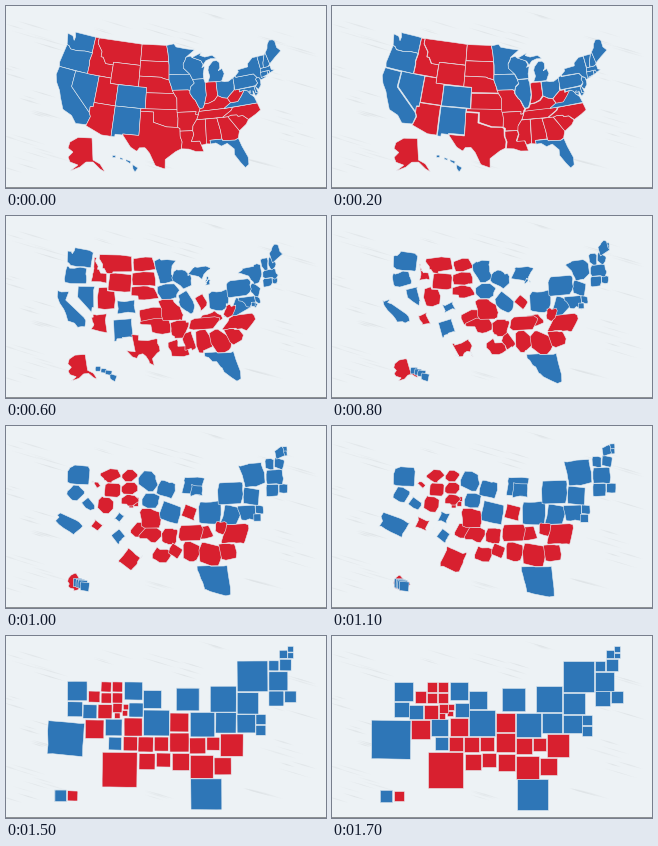
Write a matplotlib script that moves like this. It is 320 by 182 pixels and loops after 1.8 s.

```python
import numpy as np
import matplotlib.pyplot as plt
from matplotlib.animation import FuncAnimation
from matplotlib.patches import Polygon

W, H, DPI = 320, 182, 100
FRAMES, STEP = 18, 100
N = 160  # outline samples per shape
RED, BLUE = "#d8202f", "#2e76b7"
PAPER, STREAK = "#edf2f5", "#dfe4e7"

fig = plt.figure(figsize=(W / DPI, H / DPI), dpi=DPI, facecolor=PAPER)
ax = fig.add_axes([0, 0, 1, 1])
ax.set(xlim=(0, W), ylim=(H, 0))
ax.axis("off")


def geo(*values):
    """Albers projection of west longitude / latitude pairs to stage pixels."""
    lon, lat = np.radians(np.reshape(values, (-1, 2)).T)
    s1, s2 = np.sin(np.radians([29.5, 45.5]))
    n = (s1 + s2) / 2
    c = 1 - s1 ** 2 + 2 * n * s1

    def radius(phi):
        return np.sqrt(c - 2 * n * np.sin(phi)) / n

    theta = n * (np.radians(96) - lon)
    x = radius(lat) * np.sin(theta)
    y = radius(np.radians(37.5)) - radius(lat) * np.cos(theta)
    return np.column_stack([165 + 311.5 * x, 101 - 306 * y])


def flat(*values):
    return np.reshape(values, (-1, 2)).astype(float)


def dot(lon, lat, r=0.3):
    return geo(lon + r, lat + r, lon - r, lat + r, lon - r, lat - r, lon + r, lat - r)


def resample(points):
    """Even spacing along the closed outline."""
    ring = np.vstack([points, points[:1]])
    dist = np.r_[0, np.cumsum(np.hypot(*np.diff(ring, axis=0).T))]
    at = np.linspace(0, dist[-1], N, endpoint=False)
    return np.column_stack([np.interp(at, dist, ring[:, k]) for k in (0, 1)])


shapes = []


def state(color, x, y, size, points, turn=25, start=50, end=1600):
    """Morph an outline into a square, with its corners turned by some degrees."""
    square = flat(x, y, x + size, y, x + size, y + size, x, y + size)
    goal = np.roll(resample(square), round(N * turn / 360), axis=0)
    patch = Polygon(points, closed=True, fc=color, ec="#e6edf2", lw=0.4, joinstyle="round")
    ax.add_patch(patch)
    shapes.append((patch, resample(points), goal, start, end))


def streaks():
    rng = np.random.default_rng(7)
    spots = [(2, 20), (25, 30), (0, 62), (18, 88), (0, 130), (22, 140), (0, 155),
             (195, 4), (145, 20), (165, 30), (255, 26), (280, 38), (270, 70),
             (262, 108), (275, 128), (245, 150), (140, 158), (95, 18), (20, 108)]
    for x, y in spots:
        for _ in range(3):
            x0, y0 = x + rng.uniform(-8, 12), y + rng.uniform(-5, 6)
            length, thick = rng.uniform(12, 36), rng.uniform(0.5, 1.6)
            x1, y1 = x0 + length, y0 + 0.3 * length
            ax.fill([x0, (x0 + x1) / 2, x1, (x0 + x1) / 2],
                    [y0, (y0 + y1) / 2 - thick / 2, y1, (y0 + y1) / 2 + thick / 2],
                    color=STREAK, lw=0, alpha=rng.uniform(0.5, 1))


streaks()
ax.axhspan(181, 182, color="#8d9194", lw=0)

# West
state(BLUE, 61.5, 45.5, 19.5, geo(
    124.7, 48.4, 123.2, 48.2, 122.5, 47.4, 122.4, 48.2, 122.8, 49, 117, 49, 117, 46.4,
    116.9, 46, 119, 46, 121, 45.7, 122.8, 45.7, 123.4, 46.2, 124, 46.3), 40)
state(BLUE, 61.5, 66, 15, geo(
    124, 46.3, 123.4, 46.2, 122.8, 45.7, 121, 45.7, 119, 46, 116.9, 46, 117.2, 44.4,
    117, 43.8, 117, 42, 124.2, 42, 124.5, 42.8), 75)
state(BLUE, 39, 84, 40, geo(
    124.2, 42, 120, 42, 120, 39, 114.6, 35, 114.2, 34.3, 114.7, 32.7, 117.1, 32.5,
    118.4, 33.8, 120.6, 34.5, 121.9, 36.6, 122.5, 37.7, 123.7, 39, 124.4, 40.4),
    105, end=1850)
state(BLUE, 77, 68.5, 14, geo(
    120, 42, 114, 42, 114, 36.2, 114.7, 36.1, 114.6, 35, 120, 39), 100)
state(RED, 82.5, 55, 11.5, geo(
    117, 49, 116, 49, 116, 48, 114.5, 46.6, 114.5, 45.6, 113.9, 45.6, 113, 44.5,
    111, 44.5, 111, 42, 117, 42, 117, 43.8, 117.2, 44.4, 116.9, 46, 117, 46.4), 110)
state(RED, 95, 46, 10, geo(
    116, 49, 104, 49, 104, 45, 111, 45, 111, 44.5, 113, 44.5, 113.9, 45.6,
    114.5, 45.6, 114.5, 46.6, 116, 48), 80)
state(RED, 95, 57, 10, geo(111, 45, 104, 45, 104, 41, 111, 41), 30)
state(RED, 92, 68.5, 14, geo(
    114, 42, 111, 42, 111, 41, 109, 41, 109, 37, 114, 37), 50)
state(RED, 79, 83.5, 19, geo(
    114, 37, 109, 37, 109, 31.3, 111.1, 31.3, 114.8, 32.5, 114.2, 34.3, 114.6, 35,
    114.7, 36.1, 114, 36.2), 115)
state(BLUE, 99, 83, 17, geo(109, 41, 102, 41, 102, 37, 109, 37), 140)
state(BLUE, 102.5, 101, 13, geo(
    109, 37, 103, 37, 103, 32, 106.6, 32, 106.5, 31.8, 108.2, 31.8, 108.2, 31.3,
    109, 31.3), 95)

# Plains
state(RED, 106, 46, 10, geo(104, 49, 97.2, 49, 96.8, 47.5, 96.6, 45.9, 104, 45.9), 70)
state(RED, 106, 57, 10, geo(
    104, 45.9, 96.6, 45.9, 96.5, 45.3, 96.5, 42.5, 98, 42.8, 98.5, 43, 104, 43), 60)
for x, y in [(116, 68), (115, 74.5), (107, 77)]:
    state(RED, x, y, 5.5, dot(99.8, 41.5), 0, end=1700)
state(RED, 106.5, 67.5, 9, geo(
    104, 43, 98.5, 43, 98, 42.8, 96.5, 42.5, 95.8, 41, 95.7, 40.6, 95.3, 40, 102, 40,
    102, 41, 104, 41), 60)
state(RED, 117, 101, 14, geo(102, 40, 95.3, 40, 94.6, 39.1, 94.6, 37, 102, 37), 75)
state(RED, 132, 101, 15, geo(
    103, 37, 94.6, 37, 94.4, 35.4, 94.5, 33.7, 97, 33.8, 100, 34.6, 100, 36.5,
    103, 36.5), 70)
state(RED, 95.5, 116, 35.5, geo(
    103, 36.5, 100, 36.5, 100, 34.6, 97, 33.8, 94.5, 33.7, 94, 33.5, 94, 32, 93.6, 31,
    93.8, 29.7, 95, 29.2, 97.2, 27.7, 97.2, 25.9, 99.2, 26.5, 100.5, 28.8, 101.5, 29.8,
    102.7, 29.7, 103.2, 29, 104.6, 29.7, 106.5, 31.8, 106.6, 32, 103, 32), 110)

# Midwest
state(BLUE, 118, 46, 18, geo(
    97.2, 49, 95.2, 49.3, 94.6, 48.7, 92, 48.3, 89.6, 48, 92, 46.7, 92.3, 46.1,
    92.8, 45.5, 92.8, 44.7, 91.2, 43.5, 96.5, 43.5, 96.5, 45.3, 96.6, 45.9, 96.8, 47.5), 65)
state(BLUE, 122.5, 67, 14, geo(
    96.5, 43.5, 91.2, 43.5, 90.6, 42.5, 90.2, 41.8, 91.1, 41.2, 91.4, 40.4, 91.8, 40.6,
    95.7, 40.6, 95.8, 41, 96.5, 42.5), 55)
state(RED, 117.5, 82, 18, geo(
    95.7, 40.6, 91.8, 40.6, 91.4, 40.4, 91.4, 39.9, 90.7, 39, 90.2, 38.6, 89.5, 37.3,
    89.2, 37, 89.5, 36.5, 89.7, 36, 90.4, 36, 90.2, 36.5, 94.6, 36.5, 94.6, 39.1,
    95.3, 40))
state(BLUE, 137, 54.5, 18, geo(
    92, 46.7, 90.8, 46.9, 90.4, 46.6, 88.1, 45.9, 87.6, 45.1, 88, 44.6, 87.3, 44.8,
    87.8, 43.4, 87.8, 42.5, 90.6, 42.5, 91.2, 43.5, 92.8, 44.7, 92.8, 45.5, 92.3, 46.1), 60)
state(BLUE, 137, 74, 26, geo(
    90.6, 42.5, 87.8, 42.5, 87.5, 41.7, 87.5, 39.4, 88.1, 37.8, 88.5, 37.1, 89.2, 37,
    89.5, 37.3, 90.2, 38.6, 90.7, 39, 91.4, 39.9, 91.4, 40.4, 91.1, 41.2, 90.2, 41.8), 70)
state(BLUE, 170, 52, 23, geo(
    90.4, 46.6, 87.8, 47.4, 88.3, 46.9, 87, 46.5, 85, 46.7, 84, 46, 85.5, 46.1,
    86.8, 45.8, 87.6, 45.1, 88.1, 45.9), 100)
state(BLUE, 170, 52, 23, geo(
    85, 45.6, 84, 45.6, 83.4, 45.2, 83.4, 44.2, 83.9, 43.7, 82.9, 44, 82.5, 43,
    83.4, 41.7, 84.8, 41.7, 86.8, 41.8, 86.2, 42.8, 86.5, 44, 86.2, 44.7), 150)
state(RED, 163.5, 77, 19, geo(
    87.5, 41.7, 86.8, 41.8, 84.8, 41.7, 84.8, 39.1, 85.7, 38.3, 87, 37.9, 88.1, 37.8,
    87.5, 39.4), 90)
state(BLUE, 184, 76.5, 24.5, geo(
    84.8, 41.7, 83.4, 41.7, 82.7, 41.5, 81.7, 41.5, 80.5, 42, 80.5, 40.6, 80.7, 39.7,
    81.8, 39, 82.6, 38.4, 83.7, 38.6, 84.8, 39.1))

# South
state(RED, 183.5, 102, 16, geo(
    89.2, 37, 88.5, 37.1, 88.1, 37.8, 87, 37.9, 85.7, 38.3, 84.8, 39.1, 83.7, 38.6,
    82.6, 38.4, 82, 37.5, 83.7, 36.6, 89.5, 36.5), -10)
state(RED, 163.5, 97, 19, geo(
    89.5, 36.5, 83.7, 36.6, 81.7, 36.6, 82.1, 36.1, 84.3, 35, 90.2, 35, 89.7, 36))
state(RED, 148, 101, 14, geo(
    94.6, 36.5, 90.2, 36.5, 90.4, 36, 89.7, 36, 90.2, 35, 91.1, 33.9, 91.2, 33, 94, 33,
    94, 33.5, 94.5, 33.7, 94.4, 35.4), 45)
state(RED, 132.5, 117.5, 16, geo(
    94, 33, 91.2, 33, 91, 32.3, 91.6, 31, 89.8, 31, 89.5, 30.2, 89.1, 29, 90.8, 29.1,
    92.2, 29.6, 93.8, 29.7, 93.6, 31, 94, 32), 70)
state(RED, 150, 117, 14, geo(
    90.2, 35, 88.2, 35, 88.4, 30.4, 89.5, 30.2, 89.8, 31, 91.6, 31, 91, 32.3, 91.2, 33,
    91.1, 33.9), 60)
state(RED, 166, 117.5, 17, geo(
    88.2, 35, 85.6, 35, 85.1, 32.6, 85, 31, 87.6, 31, 87.5, 30.3, 88.4, 30.4))
state(RED, 184, 119.5, 23, geo(
    85.6, 35, 83.1, 35, 81.9, 33.4, 81, 32.1, 81.5, 30.8, 82.2, 30.5, 84.9, 30.7,
    85, 31, 85.1, 32.6), 40)
state(BLUE, 184.5, 143, 31, geo(
    87.6, 31, 85, 31, 84.9, 30.7, 82.2, 30.5, 81.5, 30.8, 81, 29.2, 80.1, 27, 80.2, 25.6,
    81, 25.1, 81.8, 26.2, 82.8, 27.8, 82.7, 28.9, 84, 30.1, 85.3, 29.7, 86.4, 30.4,
    87.5, 30.3), 0)
state(RED, 208, 122, 17, geo(
    83.1, 35, 82.3, 35.2, 81, 35.1, 80.8, 34.8, 79.7, 34.8, 78.6, 33.9, 79.3, 33.1,
    81, 32.1, 81.9, 33.4), 0)
state(RED, 214.5, 98, 22.5, geo(
    81.7, 36.6, 75.9, 36.6, 75.5, 35.2, 76.8, 34.6, 78.6, 33.9, 79.7, 34.8, 80.8, 34.8,
    81, 35.1, 82.3, 35.2, 83.1, 35, 84.3, 35, 82.1, 36.1))
state(BLUE, 209.5, 76.5, 20.5, geo(
    79.3, 38.4, 78.3, 39.4, 77.5, 39.1, 77, 38.4, 76.3, 37.8, 75.9, 36.6, 83.7, 36.6,
    82, 37.5, 80.3, 37.5))
state(RED, 200.5, 101.5, 13, geo(
    80.5, 40.6, 80.5, 39.7, 79.5, 39.7, 79.5, 39.2, 78.3, 39.4, 79.3, 38.4, 80.3, 37.5,
    82, 37.5, 82.6, 38.4, 81.8, 39, 80.7, 39.7), 45)

# Northeast
state(BLUE, 231, 78.5, 18.5, geo(
    79.5, 39.7, 75.8, 39.7, 75.7, 38.5, 75.1, 38.4, 75.9, 37.9, 76.3, 39, 76.4, 38.2,
    77, 38.4, 77.5, 39.1, 78.3, 39.4, 79.5, 39.2), 0)
state(BLUE, 250, 78.5, 10, geo(75.8, 39.7, 75.5, 39.8, 75.1, 38.4, 75.7, 38.5))
state(BLUE, 250, 89.5, 10, dot(77, 38.9, 0.15), 0)
state(BLUE, 231, 56.5, 21.5, geo(
    74.7, 41.3, 74, 41, 74, 40.4, 74.1, 39.7, 74.9, 39, 75.5, 39.6, 74.8, 40.2,
    75.1, 40.9))
state(BLUE, 204, 50, 26, geo(
    80.5, 42, 79.8, 42.3, 79.8, 42, 75.3, 42, 74.7, 41.3, 75.1, 40.9, 74.8, 40.2,
    75.5, 39.8, 80.5, 39.7), 35)
state(BLUE, 231, 24.5, 31, geo(
    79.8, 42.3, 78.9, 42.9, 79, 43.3, 76.3, 43.5, 76.2, 44.1, 74.7, 45, 73.4, 45,
    73.3, 42.7, 73.5, 41.1, 72, 41, 73.9, 40.6, 74, 41, 74.7, 41.3, 75.3, 42, 79.8, 42), -25)
state(BLUE, 263, 55, 15, geo(73.5, 42, 71.8, 42, 71.9, 41.3, 73.6, 41))
state(BLUE, 279, 55, 11.5, geo(71.8, 42, 71.2, 42, 71.3, 41.5, 71.9, 41.3))
state(BLUE, 263, 35.5, 19, geo(
    73.3, 42.7, 71.3, 42.7, 70.8, 42.9, 70.7, 42, 70, 41.8, 71.2, 41.5, 71.3, 42,
    73.5, 42))
state(BLUE, 263, 24.5, 10, geo(73.4, 45, 71.5, 45, 72.3, 43.6, 72.5, 42.7, 73.3, 42.7))
state(BLUE, 274, 23, 11.5, geo(
    71.5, 45, 71.1, 45.3, 70.7, 43.1, 71.3, 42.7, 72.5, 42.7, 72.3, 43.6), 40)
for x, y in [(282, 10), (282, 16.5)]:
    state(BLUE, x, y, 5.7, dot(69, 45.5), 0)
state(BLUE, 273.5, 14, 8, geo(
    71.1, 45.3, 70.3, 46, 70, 46.7, 69.2, 47.4, 68.3, 47.3, 67.8, 47, 67.8, 45.7,
    67, 44.9, 69, 44, 70.7, 43.1), 0)

# Insets, placed straight in stage pixels
state(RED, 61.5, 155, 10, flat(
    64, 136, 72, 131.5, 86, 132, 87, 154, 94, 158, 99, 166, 94, 163, 87, 156, 80, 156,
    74, 161, 64, 165, 72, 159, 64, 156, 62, 151, 67, 146, 62, 142), 50)
for island in [(106, 149, 109, 149, 109, 151, 106, 151),
               (114, 151.5, 117, 152.5, 117, 154, 114, 153),
               (120, 153.5, 125, 155.5, 124, 157.5, 120, 155),
               (126.5, 158.5, 132, 162, 129, 166, 127, 163)]:
    state(BLUE, 48, 154, 11.5, flat(*island), 40)


def ease(t, start, end):
    u = np.clip((t - start) / (end - start), 0, 1)
    return u * u * (3 - 2 * u)


def draw(i):
    for patch, source, goal, start, end in shapes:
        p = ease(i * STEP, start, end)
        patch.set_xy(source + (goal - source) * p)
    return [s[0] for s in shapes]


anim = FuncAnimation(fig, draw, frames=FRAMES, interval=STEP, repeat=True, repeat_delay=0)
plt.show()
```
